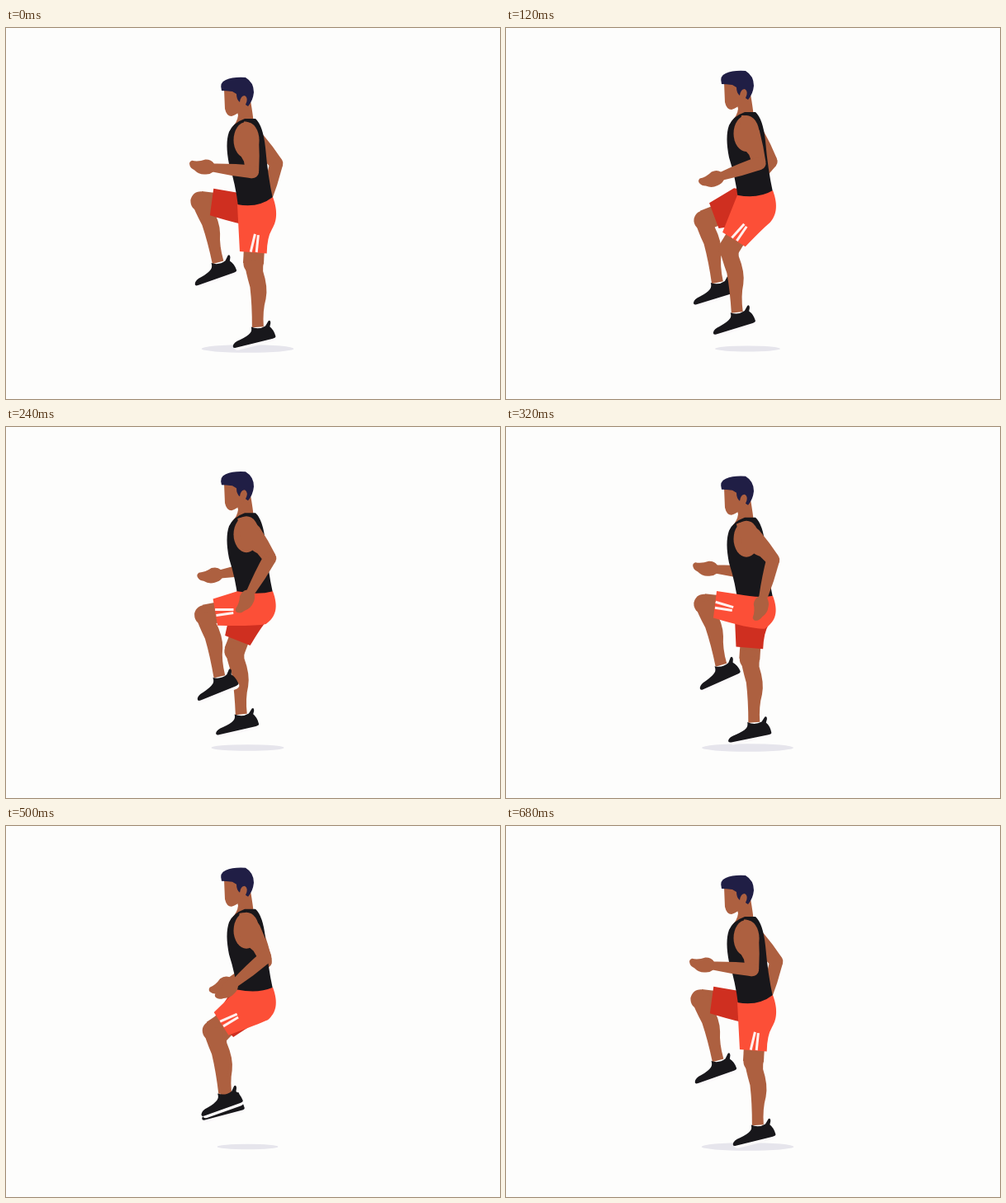
An HTML page with a canvas that plays this animation: 598x450 px, repeating every 700 ms.

```html
<!DOCTYPE html>
<html lang="en">
<head>
<meta charset="utf-8">
<title>High knees</title>
<style>
  html, body { margin: 0; width: 100%; height: 100%; overflow: hidden; background: #fdfdfc; }
  canvas { display: block; }
</style>
</head>
<body>
<canvas id="stage" width="598" height="450"></canvas>
<script>
const ctx = document.getElementById('stage').getContext('2d');

const LOOP = 700, STEP = 20, LEAD = 10;
const HIP = [303, 222], FAR_HIP = [299, 218];
const SHOULDER = [291, 130], FAR_SHOULDER = [295, 133];
const THIGH = 64, SHIN = 76, UPPER_ARM = 45;

const color = {
  paper: '#fdfdfc', shadow: '#e6e5ec', skin: '#ad6040', hair: '#201e45', dark: '#18171b',
  sole: '#fbf9fa', shorts: '#fc4f37', farShorts: '#cf2f20', stripe: '#fff0ee'
};

const shape = {
  shin: new Path2D('M-11 -5 Q-10 10 -6 28 Q-5 50 -7 77 L7 77 Q7 58 12 44 Q16 30 11 10 L12 -2 Z'),
  shoe: new Path2D('M-8 -1 Q0 5 9 2 L14 -3 Q17 -4 16 0 L14 4 Q18 9 18 17 Q18 19 14 19 L-32 19 Q-36 19 -35 16 Q-33 12 -25 11 Q-15 9 -11 6 Q-8 4 -8 -1 Z'),
  sole: new Path2D('M-34 17 L18 17 Q19 22 14 22.5 L-30 22.5 Q-35 22 -34 17 Z'),
  upperArm: new Path2D('M-13 6 Q-12 22 -8 31 L-8 46 L8 46 Q12 28 14 8 Q13 -14 0 -17 Z'),
  forearm: new Path2D('M-8 0 Q-8 22 -5 49 L5 49 Q8 24 8 0 Z'),
  hand: new Path2D('M-5 47 Q-10 51 -9 58 Q-5 66 -6 74 Q-4 78 0 76 Q3 75 5 70 Q10 64 9 57 Q9 51 5 47 Z'),
  shirt: new Path2D('M289 110 L302 110 Q311 118 314 145 Q317 180 323 207 Q302 219 281 216 Q278 190 270 165 Q265 140 270 126 Q275 115 289 110 Z'),
  neck: new Path2D('M279 98 L281 106 Q280 114 274 120 L300 116 Q299 106 296 88 Z'),
  face: new Path2D('M264 74 L265 98 Q267 107 273 107 Q280 105 285 99 L294 92 L294 74 Z'),
  hair: new Path2D('M261 76 Q258 66 266 63 Q275 59 290 60 Q300 66 300 78 Q299 88 293 95 L290 93 Q294 85 289 82 Q284 82 283 90 Q279 87 279 80 L274 77 Q266 76 261 76 Z')
};

const rad = degrees => degrees * Math.PI / 180;

function fill(path, paint) {
  ctx.fillStyle = paint;
  ctx.fill(path);
}

function disc(x, y, rx, ry, paint) {
  ctx.fillStyle = paint;
  ctx.beginPath();
  ctx.ellipse(x, y, rx, ry, 0, 0, 2 * Math.PI);
  ctx.fill();
}

function line(x1, y1, x2, y2, width, paint) {
  ctx.lineWidth = width;
  ctx.strokeStyle = paint;
  ctx.beginPath();
  ctx.moveTo(x1, y1);
  ctx.lineTo(x2, y2);
  ctx.stroke();
}

function at([x, y], degrees, draw) {
  ctx.save();
  ctx.translate(x, y);
  ctx.rotate(rad(degrees));
  draw();
  ctx.restore();
}

// swing runs from 1 (leg down, arm forward) to -1 (knee up, arm back).
const thighAngle = swing => 50 - 47 * swing;

function leg(hip, swing, footAngle) {
  const thigh = thighAngle(swing);
  const shin = -10 + 6 * swing;
  at(hip, thigh, () => {
    line(0, 20, 0, THIGH, 25, color.skin);
    at([0, THIGH], shin - thigh, () => {
      disc(0, 0, 12, 12, color.skin);
      fill(shape.shin, color.skin);
      at([0, SHIN], footAngle - shin, () => {
        fill(shape.sole, color.sole);
        fill(shape.shoe, color.dark);
      });
    });
  });
}

function shortsLeg(hip, swing, paint) {
  const thigh = thighAngle(swing);
  const lift = (1 - swing) / 2;
  const hem = offset => {
    const a = rad(thigh + offset);
    return [-53 * Math.sin(a), 53 * Math.cos(a)];
  };
  at(hip, 0, () => {
    ctx.fillStyle = paint;
    ctx.beginPath();
    ctx.moveTo(-23, -8 - 11 * lift);
    ctx.quadraticCurveTo(2, -3 - 11 * lift, 20, -17);
    ctx.bezierCurveTo(27, 2, 24, 14, 19 - 9 * lift, 22 + lift);
    ctx.quadraticCurveTo(13 - 18 * lift, 32 - 8 * lift, ...hem(-17));
    ctx.lineTo(...hem(19));
    ctx.closePath();
    ctx.fill();
  });
}

function stripes(hip, swing) {
  at(hip, thighAngle(swing), () => {
    line(-4, 50, 0, 28, 3, color.stripe);
    line(3, 50, 4, 29, 3, color.stripe);
  });
}

function arm(shoulder, swing) {
  const upper = -27.5 + 18.5 * swing;
  const lower = 55 + 41 * swing;
  at(shoulder, upper, () => {
    fill(shape.upperArm, color.skin);
    at([0, UPPER_ARM], lower - upper, () => {
      disc(0, 0, 8, 8, color.skin);
      fill(shape.forearm, color.skin);
      fill(shape.hand, color.skin);
    });
  });
}

function head() {
  fill(shape.neck, color.skin);
  fill(shape.face, color.skin);
  fill(shape.hair, color.hair);
}

function drawFrame(time) {
  const phase = (time + LEAD) / LOOP * 2 * Math.PI;
  const swing = Math.cos(phase);
  const jump = 9.5 * (1 - Math.cos(2 * phase)) / 2;
  const shadow = 56 - 2.05 * jump;

  ctx.fillStyle = color.paper;
  ctx.fillRect(0, 0, 598, 450);
  disc(292.5, 389, shadow, shadow / 11.5, color.shadow);

  ctx.save();
  ctx.translate(0, -jump);
  arm(FAR_SHOULDER, -swing);
  leg(FAR_HIP, -swing, -15.5 - 4 * swing);
  shortsLeg(FAR_HIP, -swing, color.farShorts);
  leg(HIP, swing, -19 + 5 * swing);
  head();
  fill(shape.shirt, color.dark);
  shortsLeg(HIP, swing, color.shorts);
  stripes(HIP, swing);
  disc(291, 136, 15.5, 22, color.skin);
  arm(SHOULDER, swing);
  ctx.restore();
}

const start = performance.now();
function tick() {
  const elapsed = (performance.now() - start) % LOOP;
  drawFrame(Math.floor(elapsed / STEP) * STEP);
  requestAnimationFrame(tick);
}
tick();
</script>
</body>
</html>
```
